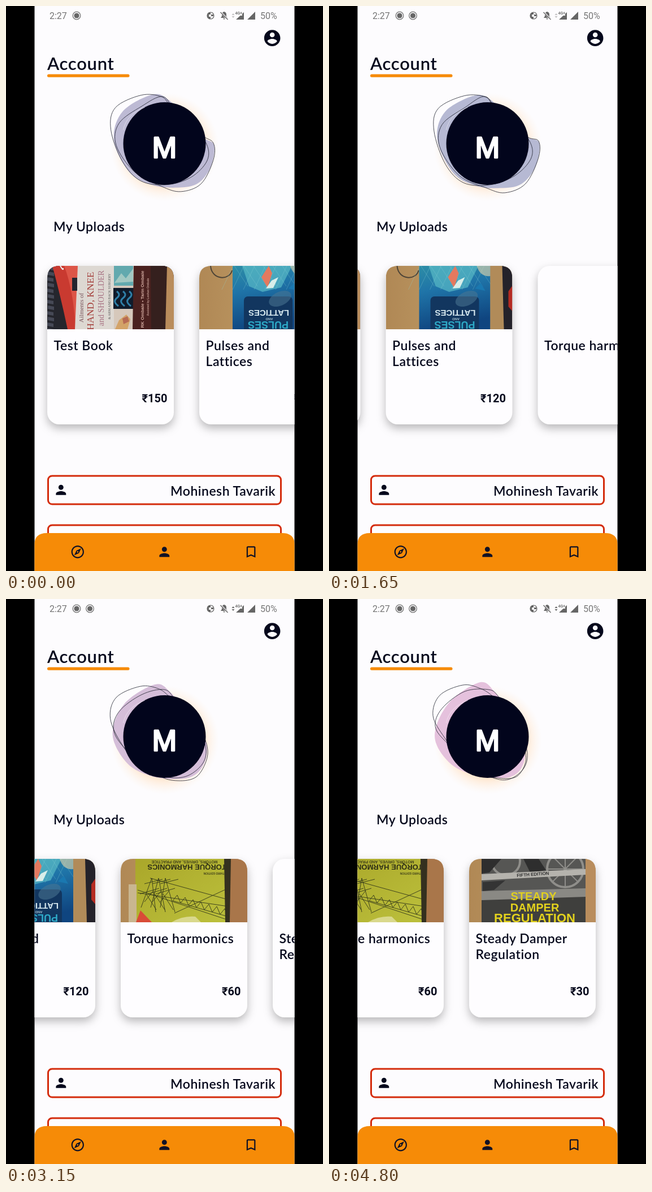
Write an HTML page that moves like this. It is 561 px wide and 998 px high and loops after 4.85 s.

```html
<!DOCTYPE html>
<html lang="en">
<head>
<meta charset="utf-8">
<title>Account</title>
<style>
  html, body { margin: 0; width: 100%; height: 100%; overflow: hidden; background: #000; }
  svg { display: block; width: 100%; height: 100%; }
  text { font-family: Lato, sans-serif; font-weight: 600; fill: #05081c; }
  .label { font-size: 23px; letter-spacing: .5px; }
  .price { font: 700 20px Roboto, sans-serif; text-anchor: end; }
  .status { font: 400 16px Roboto, sans-serif; fill: #757575; }
  .print { font: 700 10px "Liberation Sans", Arial, sans-serif; text-anchor: middle; }
  .serif { font: 400 15px "Liberation Serif", serif; }
  .initial { font: 400 52px "Liberation Sans", Arial, sans-serif; text-anchor: middle;
    fill: #fff; stroke: #fff; stroke-width: 3; stroke-linejoin: round; }
  .card { filter: drop-shadow(0 7px 8px rgba(0, 0, 0, .27)); }
  .field { fill: none; stroke: #d42b0b; stroke-width: 3; }
</style>
</head>
<body>
<svg viewBox="0 0 561 998" xmlns="http://www.w3.org/2000/svg">
  <defs>
    <clipPath id="screen"><rect x="50.5" width="460" height="998"/></clipPath>
    <clipPath id="cover"><path d="M0 112V22Q0 0 22 0H202Q224 0 224 22V112z"/></clipPath>
    <radialGradient id="glow">
      <stop offset=".68" stop-color="#ffdcb8" stop-opacity=".75"/>
      <stop offset="1" stop-color="#fff0e0" stop-opacity="0"/>
    </radialGradient>
    <linearGradient id="sea" x2=".25" y2="1">
      <stop stop-color="#2d8da6"/><stop offset=".4" stop-color="#1f74a8"/><stop offset="1" stop-color="#0f4580"/>
    </linearGradient>
    <linearGradient id="wood" x2="1"><stop stop-color="#b08855"/><stop offset="1" stop-color="#c9a871"/></linearGradient>
    <linearGradient id="lime" y2="1"><stop stop-color="#aaa72a"/><stop offset="1" stop-color="#bcc03c"/></linearGradient>
    <path id="person" d="M12 12c2.21 0 4-1.79 4-4s-1.79-4-4-4-4 1.79-4 4 1.79 4 4 4zm0 2c-2.67 0-8 1.34-8 4v2h16v-2c0-2.66-5.33-4-8-4z"/>
    <g id="record"><circle r="6.8" fill="none" stroke="#757575" stroke-width="1.3"/><circle r="4.6" fill="#666"/></g>
  </defs>

  <g clip-path="url(#screen)">
    <rect width="561" height="998" fill="#fdfcfe"/>

    <!-- status bar -->
    <text class="status" x="77" y="22.5">2:27</text>
    <use href="#record" x="125" y="17"/>
    <use href="#record" id="record2" x="148.5" y="17"/>
    <g fill="#666">
      <circle cx="362" cy="17" r="6" fill="none" stroke="#666" stroke-width="1.2"/>
      <path d="M362 11a6 6 0 0 0 0 12v-4h-3v-4h3zM363 15h4v3h-4z"/>
      <path d="M380 21h12l-2-3v-3q0-4-4-5-4 1-4 5v3zM384 22h4q-2 3-4 0z"/>
      <path d="M379 10L393 24" stroke="#fdfcfe" stroke-width="3"/>
      <path d="M379.5 11L392.5 24" stroke="#666" stroke-width="1.4"/>
      <path id="arrows" d="M399.5 16l2.500-3 2.500 3zM399.500 18l2.500 3 2.500-3z"/>
      <path d="M407 24L421 11V24zM427 24L441 10V24z"/>
      <path d="M405 9h13v8h-13z" fill="#fdfcfe"/>
    </g>
    <text class="status" x="405.5" y="15" style="font-size:7px;font-weight:700">4G+</text>
    <text class="status" x="450" y="22.5">50%</text>

    <!-- heading -->
    <path fill="#05081c" transform="translate(454 39.5) scale(1.43)" d="M12 2C6.48 2 2 6.48 2 12s4.48 10 10 10 10-4.48 10-10S17.52 2 12 2zm0 3c1.66 0 3 1.34 3 3s-1.34 3-3 3-3-1.34-3-3 1.34-3 3-3zm0 14.2c-2.5 0-4.71-1.28-6-3.22.03-1.99 4-3.08 6-3.08 1.99 0 5.97 1.09 6 3.08-1.29 1.94-3.5 3.22-6 3.22z"/>
    <text x="73" y="113" font-size="31" letter-spacing=".7">Account</text>
    <rect x="73" y="120.5" width="145.5" height="5.3" rx="2.500" fill="#f68b07"/>

    <!-- avatar -->
    <circle cx="281" cy="249" r="96" fill="url(#glow)"/>
    <path id="fill"/>
    <g fill="none" stroke="#20232f" stroke-width=".8"><path id="line1"/><path id="line2"/></g>
    <circle cx="280.5" cy="243" r="73" fill="#02051c"/>
    <path d="M207.5 219Q213 191 246 179" fill="none" stroke="#fff" stroke-opacity=".55" stroke-width=".8"/>
    <text class="initial" x="280.5" y="267.5">M</text>

    <text class="label" x="84" y="397.5">My Uploads</text>
    <g id="list"></g>

    <!-- profile fields -->
    <rect class="field" x="74.5" y="830" width="412" height="50" rx="7"/>
    <use href="#person" fill="#05081c" transform="translate(83.9 841.4) scale(1.118)"/>
    <text class="label" x="477" y="865" text-anchor="end">Mohinesh Tavarik</text>
    <rect class="field" x="74.5" y="917" width="412" height="50" rx="7"/>

    <!-- bottom bar -->
    <path d="M50 998V953Q50 931 72 931H489Q511 931 511 953V998z" fill="#f68b07"/>
    <g fill="#111225">
      <path transform="translate(113.4 950.8) scale(1.118)" d="M12 2C6.48 2 2 6.48 2 12s4.48 10 10 10 10-4.48 10-10S17.52 2 12 2zm0 18c-4.41 0-8-3.59-8-8s3.59-8 8-8 8 3.59 8 8-3.59 8-8 8zm-5.5-2.5l7.51-3.49L17.5 6.5 9.99 9.99 6.5 17.5zm5.5-6.6c.61 0 1.1.49 1.1 1.1s-.49 1.1-1.1 1.1-1.1-.49-1.1-1.1.49-1.1 1.1-1.1z"/>
      <use href="#person" transform="translate(266.9 950.8) scale(1.118)"/>
      <path transform="translate(420.2 950.8) scale(1.118)" d="M17 3H7c-1.1 0-2 .9-2 2v16l7-3 7 3V5c0-1.1-.9-2-2-2zm0 15l-5-2.18L7 18V5h10v13z"/>
    </g>
  </g>
</svg>

<script>
const $ = id => document.getElementById(id);
const LOOP = 4850;

const rect = (x, y, w, h, fill) => `<rect x="${x}" y="${y}" width="${w}" height="${h}" fill="${fill}"/>`;
const path = (d, fill, extra = '') => `<path d="${d}" fill="${fill}" ${extra}/>`;
const print = (text, x, y, turn, size, fill, cls = '') =>
  `<text class="print ${cls}" transform="translate(${x} ${y}) rotate(${turn})" style="font-size:${size}px;fill:${fill}">${text}</text>`;
const repeat = (n, f) => Array.from({ length: n }, (_, i) => f(i)).join('');

const anatomyCover = () =>
  rect(0, 0, 224, 112, '#25262d') +
  repeat(12, i => path(`M${i % 2} ${i * 10}l11 2v6l-11-2z`, '#464956')) +
  path('M9 0H54V112H36Q24 55 9 0z', '#c93a30') +
  path('M30 0H54V112H50Q47 45 30 0z', '#dd5547') +
  path('M23 0q6 10 5 4', 'none', 'stroke="#eee" stroke-width="2"') +
  path('M54 0H118V112H49z', '#ddd8d2') + rect(44, 21, 9, 23, '#23242e') +
  print('Ailments of', 64, 74, -90, 11, '#765058', 'serif') +
  print('HAND, KNEE', 82, 62, -90, 17, '#a33c38', 'serif') +
  print('and SHOULDER', 100, 57, -90, 14, '#a77182', 'serif') +
  print('&amp; ARM AND BACK SURGERY', 112, 54, -90, 6, '#555', 'serif') +
  rect(118, 0, 36, 112, '#d6c8bb') + rect(118, 0, 34, 35, '#62a9ae') +
  path('M119 30l12-17 8 9 13-17v23z', '#a2c8c2') + rect(117, 39, 36, 37, '#101b2b') +
  repeat(3, i => path(`M${123 + i * 11} 45q8 6 0 12t3 14`, 'none', 'stroke="#2f7fa8" stroke-width="3"')) +
  path('M120 112l7-16 13-10 7 8-5 18z', '#d3a368') + path('M133 93l9-4 3 9-10 5z', '#b76b54') +
  path('M153 0H212L209 112H151z', '#4a211f') + path('M183 0h29l-3 112h-25z', '#35201e') +
  print('RK Ombale &#8226; Tarin Ombale', 171, 59, -90, 8, '#d2aaa0') +
  print('Assisted by Leshan Ombale', 180, 55, -90, 5, '#c09a91') +
  path('M212 0h12v112h-15z', '#b98c5b');

const wavesCover = () =>
  rect(0, 0, 224, 112, 'url(#wood)') +
  path('M20 0C22 26 54 26 58 8', 'none', 'stroke="#4d4437" stroke-width="2"') +
  rect(59, 0, 126, 112, 'url(#sea)') +
  path('M76 0H164L145 38 112 46 88 36z', '#5cbfca', 'opacity=".65"') +
  repeat(7, i => path(`M${60 + i * 19} 0l-20 42M${62 + i * 17} 0l24 36`, 'none', 'stroke="#8bd4d8" stroke-opacity=".3"')) +
  path('M110 20l13-20 6 13-8 26z', '#e4795f') + path('M118 40l10-14 12-6-9 19z', '#d8eeea') +
  path('M158 40l10-10 8 14z', '#1a78b0') + path('M161 0h24v18q-18 2-24-18z', '#d6cfac', 'opacity=".65"') +
  '<rect x="79" y="54" width="86" height="70" rx="7" fill="#12365f"/>' +
  '<ellipse cx="143" cy="58" rx="21" ry="12" transform="rotate(-25 143 58)" fill="#4b7793" opacity=".55"/>' +
  print('LATTICES', 123, 78, 180, 15, '#d6e8ef') + print('AND', 124, 92, 180, 6, '#a6c1cf') +
  print('PULSES', 122, 98, 180, 18, '#2da9c7') +
  path('M185 0h23l1 112h-24z', '#b18b59') + path('M206 0h18v112h-15z', '#24222a') + path('M217 45l7-10v45l-7-8z', '#b52b22');

const towerCover = () =>
  rect(0, 0, 224, 112, 'url(#wood)') + rect(26, 0, 164, 112, 'url(#lime)') + rect(14, 45, 14, 67, '#c9b690') +
  print('MOTORS, DRIVES, AND PRACTICE', 113, 3, 180, 7, '#45461b') +
  print('TORQUE HARMONICS', 117, 10, 180, 13, '#2f3016') +
  print('THIRD EDITION', 165, 24, 180, 5, '#45461b') +
  '<g fill="none" stroke="#33371a" stroke-width=".9">' +
  repeat(3, i => `<path d="M${36 + i * 17} 86L${55 + i * 12} 34L${62 + i * 17} 94M${45 + i * 15} 62l18 28M${58 + i * 14} 56l-16 20M${34 + i * 14} 62l34-10M${42 + i * 14} 44l32-8"/>`) +
  '<path d="M30 55L190 108M30 60L190 84M95 96L190 52M52 34L190 72"/>' +
  repeat(7, i => `<path d="M${92 + i * 14} ${74 + i * 4}l8-10 6 14z"/>`) + '</g>' +
  path('M27 112l8-21 20 21z', '#d94b37') + path('M90 112q20-12 42-10l10 10z', '#d9d88c') +
  path('M183 0h12v112h-10z', '#34301f') + path('M195 0h29v112h-31z', '#a9764a');

const machineCover = () =>
  rect(0, 0, 224, 112, 'url(#wood)') + rect(22, 0, 184, 112, '#565654') + rect(22, 66, 184, 46, '#3f3f3d') +
  '<g fill="none" stroke="#8f8e8a" stroke-width="4"><circle cx="170" cy="18" r="32"/><circle cx="65" cy="4" r="25"/>' +
  repeat(8, i => `<path stroke-width="2" d="M170 18l${32 * Math.cos(i * .785)} ${32 * Math.sin(i * .785)}"/>`) + '</g>' +
  path('M22 0h35L36 24 22 26zM96 0h27l13 20-28 4z', '#2e2e2e') +
  path('M22 27L206 18v10L22 38z', '#b5b3ad') + path('M22 57l184-5v15L22 73z', '#8a8984') +
  path('M24 41l40-3-20 17-20 2z', '#343434') +
  print('FIFTH EDITION', 113, 30, -4, 8, '#333') +
  print('STEADY', 114, 73, 0, 20, '#e0cf20') + print('DAMPER', 116, 93, 0, 20, '#e3d21d') +
  print('REGULATION', 116, 112, 0, 22, '#e3d21d') +
  rect(206, 0, 18, 112, '#b98d5d');

const books = [
  [['Test Book'], 150, anatomyCover],
  [['Pulses and', 'Lattices'], 120, wavesCover],
  [['Torque harmonics'], 60, towerCover],
  [['Steady Damper', 'Regulation'], 30, machineCover],
];
$('list').innerHTML = books.map(([lines, price, cover], i) => `
  <g transform="translate(${73 + i * 269} 459)">
    <rect class="card" width="224" height="280" rx="21" fill="#fefdff"/>
    <g id="cover${i}" clip-path="url(#cover)">${cover()}</g>
    ${lines.map((line, n) => `<text class="label" x="11.5" y="${149 + n * 28}">${line}</text>`).join('')}
    <text class="price" x="212.5" y="240.5">₹${price}</text>
  </g>`).join('');

// Scroll offset over time: [ms, px], joined by a monotone cubic.
const scrollKeys = [[0, 0], [750, 0], [1050, 61.5], [1350, 172], [1650, 241.5], [2050, 279], [2400, 284],
  [2800, 284], [3150, 408], [3500, 590], [3850, 631], [4200, 632], [LOOP, 632]];
const secant = i => {
  const a = scrollKeys[i], b = scrollKeys[i + 1];
  return a && b ? (b[1] - a[1]) / (b[0] - a[0]) : 0;
};
const slope = i => {
  const a = secant(i - 1), b = secant(i);
  return a * b > 0 ? 2 * a * b / (a + b) : 0;
};
function scrollAt(t) {
  const i = scrollKeys.findIndex((key, n) => n && t < key[0]) - 1;
  const [t0, y0] = scrollKeys[i], [t1, y1] = scrollKeys[i + 1];
  const d = t1 - t0, u = (t - t0) / d, v = 1 - u;
  return v * v * (1 + 2 * u) * y0 + u * u * (3 - 2 * u) * y1 + u * v * d * (v * slope(i) - u * slope(i + 1));
}

// Each blob swings between two poses of x, y pairs.
const blobs = {
  fill: [
    [257,159, 286,166, 318,200, 351,230, 374,240, 367,283, 341,315, 303,322, 260,318, 220,295, 192,235, 205,187],
    [267,147, 294,165, 318,200, 340,240, 346,268, 344,290, 332,308, 308,316, 255,310, 212,288, 187,242, 212,184]],
  line1: [
    [278,161, 292,178, 330,210, 357,240, 358,268, 330,298, 285,316, 238,314, 206,282, 186,222, 193,182, 240,159],
    [265,157, 290,172, 325,210, 349,262, 346,297, 318,319, 285,314, 240,290, 205,245, 184,206, 196,170, 236,152]],
  line2: [
    [276,160, 300,190, 350,231, 373,237, 372,268, 349,314, 312,331, 278,322, 232,303, 197,252, 200,211, 240,181],
    [282,160, 300,172, 330,215, 345,262, 347,290, 331,314, 300,316, 265,306, 210,255, 188,225, 200,193, 240,163]],
};
const mix = (a, b, p) => a.map((v, i) => v + (b[i] - v) * p);

function smoothLoop(c) {
  const n = c.length / 2, at = i => { const k = (i + n) % n * 2; return [c[k], c[k + 1]]; };
  let d = `M${at(0)}`;
  for (let i = 0; i < n; i++) {
    const [a, b, e, f] = [at(i - 1), at(i), at(i + 1), at(i + 2)];
    d += `C${b.map((v, k) => v + (e[k] - a[k]) / 6)} ${e.map((v, k) => v - (f[k] - b[k]) / 6)} ${e}`;
  }
  return d + 'z';
}

const ramp = (t, start, length) => Math.min(1, Math.max(0, (t - start) / length));

function draw(now) {
  const t = Math.floor(now % LOOP / 50) * 50;
  const p = (1 - Math.cos(Math.PI * (t - 1050) / 3450)) / 2;
  for (const id in blobs) $(id).setAttribute('d', smoothLoop(mix(...blobs[id], p)));
  $('fill').setAttribute('fill', `rgb(${mix([178, 184, 210], [230, 193, 221], p).map(Math.round)})`);
  $('list').setAttribute('transform', `translate(${-scrollAt(t)} 0)`);
  $('cover2').setAttribute('opacity', ramp(t, 2350, 500));
  $('cover3').setAttribute('opacity', ramp(t, 3400, 500));
  $('record2').setAttribute('opacity', t < 500 ? 0 : 1);
  $('arrows').setAttribute('opacity', t < 1700 ? .4 : 1);
  requestAnimationFrame(() => draw(performance.now()));
}
draw(performance.now());
</script>
</body>
</html>
```
